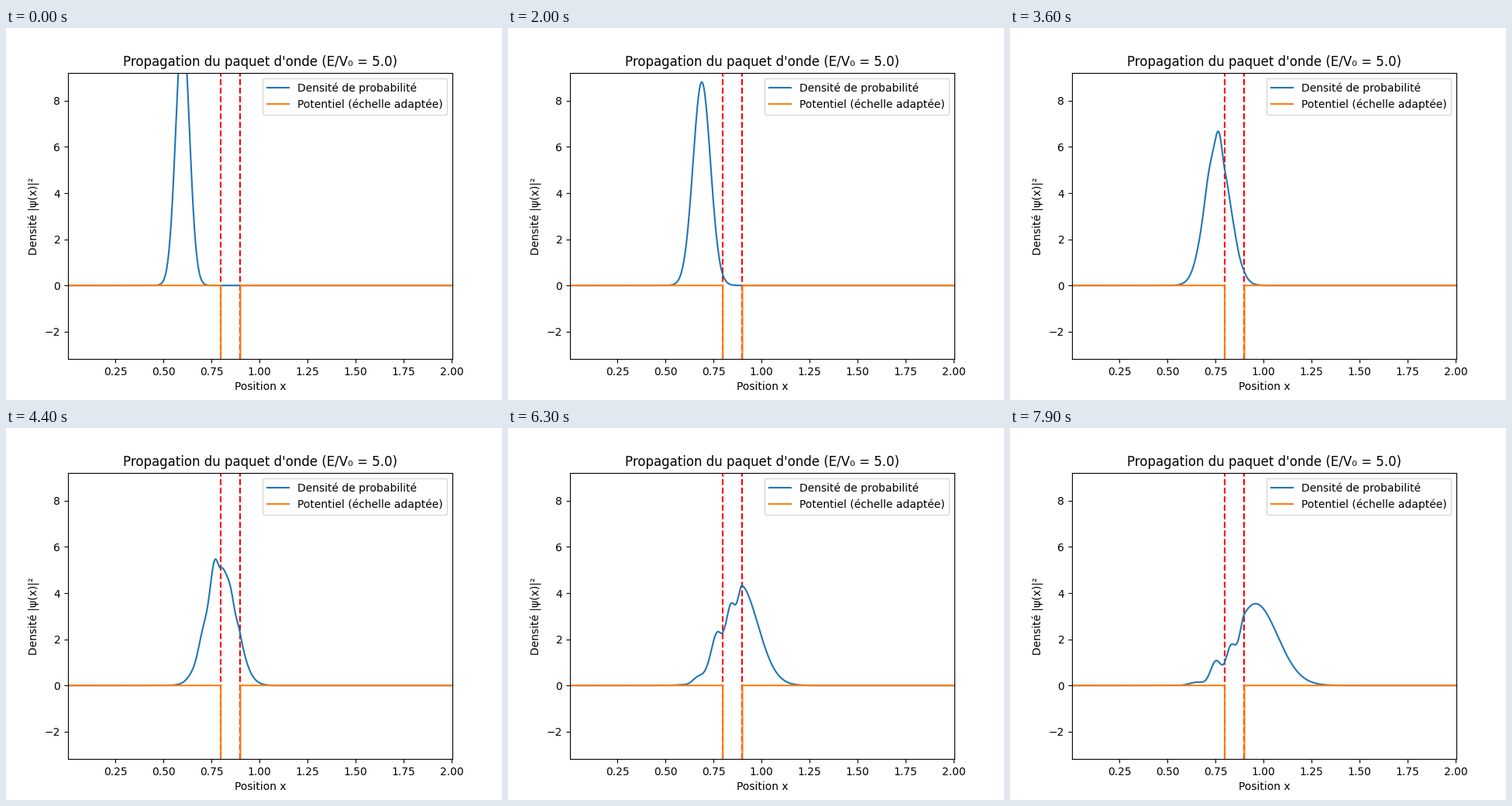
A matplotlib script for the animation above (8000 ms loop, 640 by 480 pixels).

```python
import numpy as np
import matplotlib.pyplot as plt
from matplotlib.animation import FuncAnimation

FRAMES, INTERVAL = 80, 100
STEPS, DT = 100, 1e-6          # solver steps per frame, time step

# Grid, square well and initial Gaussian packet (hbar = m = 1)
DX, N = 0.001, 2048
V0, RATIO = -200.0, 5.0
X0, SIGMA = 0.6, 0.05
LEFT, RIGHT = 0.8, 0.9

x = DX * np.arange(N)
inside = (x > LEFT - DX / 2) & (x < RIGHT + DX / 2)
V = np.where(inside, V0, 0.0)


def densities():
    """Split-step evolution, one probability density per frame."""
    k0 = np.sqrt(2 * RATIO * abs(V0))
    k = 2 * np.pi * np.fft.fftfreq(N, DX)
    half = np.exp(-0.5j * V * DT)
    kinetic = np.exp(-0.5j * k**2 * DT)
    psi = np.exp(1j * k0 * x - (x - X0)**2 / (2 * SIGMA**2))
    psi /= np.sqrt(SIGMA * np.sqrt(np.pi))
    out = [np.abs(psi)**2]
    for _ in range(FRAMES - 1):
        for _ in range(STEPS):
            psi = half * np.fft.ifft(kinetic * np.fft.fft(half * psi))
        out.append(np.abs(psi)**2)
    return out


density = densities()

fig, ax = plt.subplots(figsize=(6.4, 4.8), dpi=100)
for edge in (LEFT, RIGHT):
    ax.axvline(edge, color="red", linestyle="--")
curve, = ax.plot(x, density[0], color="C0", label="Densité de probabilité")
ax.plot(x, V, color="C1", label="Potentiel (échelle adaptée)")

ax.set_xlim(0.0038, 2.0038)
ax.set_ylim(-3.19, 9.22)
ax.set_title("Propagation du paquet d'onde (E/V₀ = 5.0)")
ax.set_xlabel("Position x")
ax.set_ylabel("Densité |ψ(x)|²")
ax.legend(loc="upper right")


def update(i):
    curve.set_ydata(density[i])
    return curve,


anim = FuncAnimation(fig, update, frames=FRAMES, interval=INTERVAL,
                     repeat=True, repeat_delay=0, blit=False)
plt.show()
```
